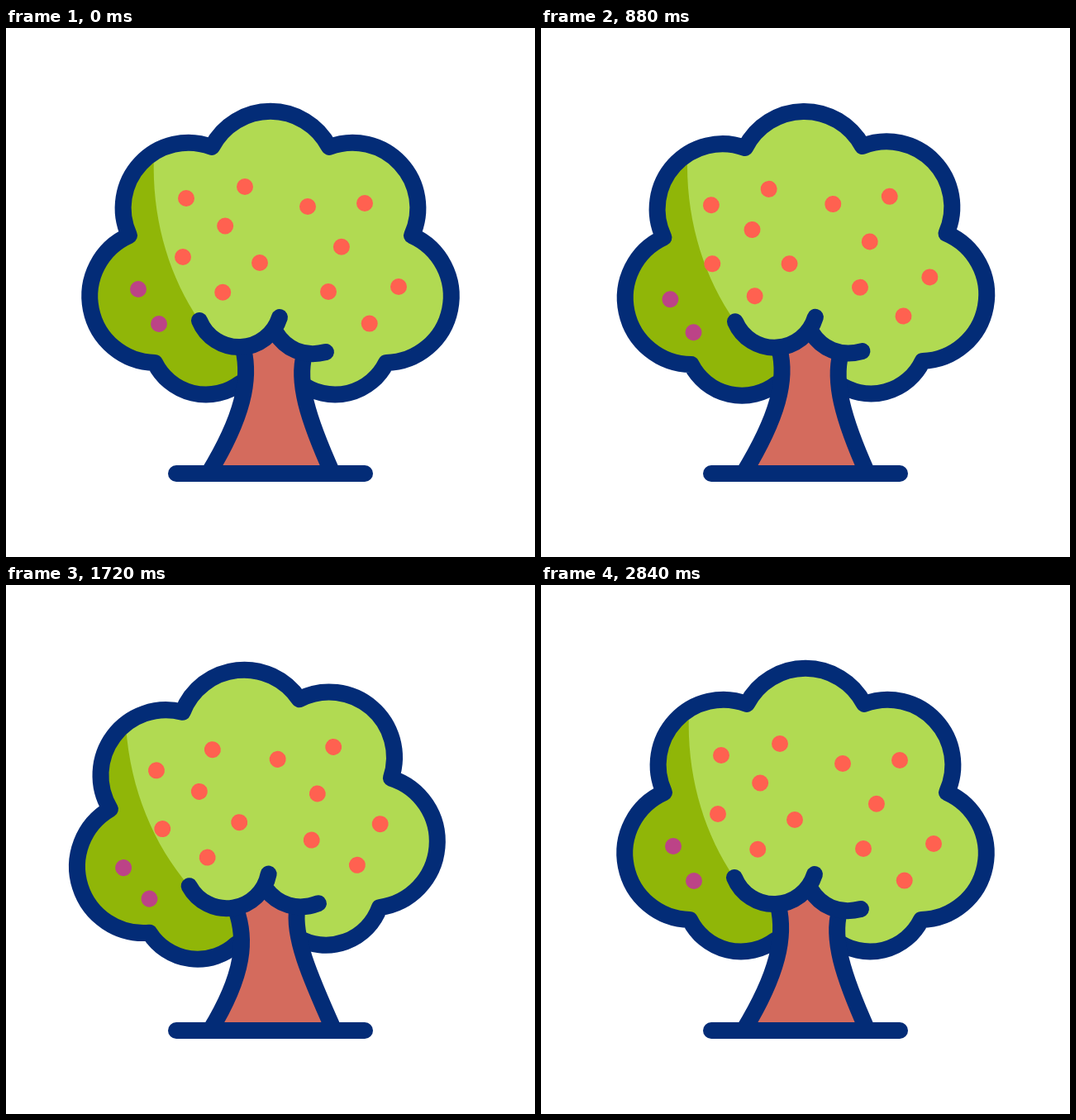
These frames come from a looping animation (640 px wide and 640 px high, 3 s). An HTML page with a canvas:

```html
<!DOCTYPE html>
<html lang="en">
<head>
<meta charset="utf-8">
<title>Tree in the wind</title>
<style>
html, body { margin: 0; width: 100%; height: 100%; overflow: hidden; background: #fff; }
canvas { display: block; width: 640px; height: 640px; }
</style>
</head>
<body>
<canvas id="stage" width="640" height="640"></canvas>
<script>
const ctx = document.getElementById('stage').getContext('2d');
const LOOP = 3000, STEP = 40, START = 120, HALF_SWING = 520;
const NAVY = '#032c77', LIGHT = '#b1da52', DARK = '#90b608', BARK = '#d46b5d',
      RED = '#ff6150', PURPLE = '#bc4387', TEAL = '#67cbd2';
const CENTER = { x: 320, y: 325 };
const SWAY = [0, -0.91, 1, -0.56, 1, 0];

const ease = p => (1 - Math.cos(Math.PI * Math.min(1, Math.max(0, p)))) / 2;

// Every part sways by the same rule, with its own size and delay.
function sway(t, size, delay) {
  const swings = Math.max(0, (t - START - delay) / HALF_SWING);
  const i = Math.min(Math.floor(swings), SWAY.length - 2);
  return size * (SWAY[i] + (SWAY[i + 1] - SWAY[i]) * ease(swings - i));
}

function makePose(degrees, shift, lift) {
  const angle = degrees * Math.PI / 180;
  return { angle, shift, x: CENTER.x + shift, y: CENTER.y + lift * (1 - Math.cos(angle)) };
}

function place(pose, x, y) {
  const dx = x - CENTER.x, dy = y - CENTER.y;
  const c = Math.cos(pose.angle), s = Math.sin(pose.angle);
  return [pose.x + dx * c - dy * s, pose.y + dx * s + dy * c];
}

function withPose(pose, draw) {
  ctx.save();
  ctx.translate(pose.x, pose.y);
  ctx.rotate(pose.angle);
  ctx.translate(-CENTER.x, -CENTER.y);
  draw();
  ctx.restore();
}

// The crown is symmetric: lobes run from notch to notch up the left side and down the right.
function crownPath() {
  const left = [[283, 430], [180, 405], [149, 251], [249, 144]];
  const radii = [69, 80.5, 79, 80];
  const notches = [...left, ...left.map(([x, y]) => [640 - x, y]).reverse()];
  const arcs = notches.slice(1).map(([x, y], i) => {
    const r = radii[Math.min(i, 6 - i)];
    return `A${r} ${r} 0 0 1 ${x} ${y}`;
  });
  return new Path2D(`M${left[0]}${arcs.join('')}`);
}

const crown = crownPath();
const lightSide = new Path2D(
  'M179 60V155C176 230 197 300 234 354Q252 386 285 386L320 440V480H600V60Z');
const curls = new Path2D(
  'M234 354A51.6 51.6 0 0 0 331 350M326 368C338 388 360 399 387 392');

function drawCrown() {
  ctx.fillStyle = DARK;
  ctx.fill(crown);
  ctx.save();
  ctx.clip(crown);
  ctx.fillStyle = LIGHT;
  ctx.fill(lightSide);
  ctx.restore();
  ctx.stroke(crown);
}

function dot(x, y, color) {
  ctx.beginPath();
  ctx.arc(x, y, 10, 0, 2 * Math.PI);
  ctx.fillStyle = color;
  ctx.fill();
}

// Three fruits: two given ones and a third hanging below the line between them.
function drawCluster(x0, y0, x1, y1, drop) {
  const dx = x1 - x0, dy = y1 - y0, length = Math.hypot(dx, dy);
  dot(x0, y0, RED);
  dot(x1, y1, RED);
  dot(x0 + 0.55 * dx - drop * dy / length, y0 + 0.55 * dy + drop * dx / length, RED);
}

function drawFruits() {
  drawCluster(218, 206, 289, 192, 42);
  drawCluster(214, 277, 307, 284, 39);
  drawCluster(365, 216, 434, 212, 51);
  drawCluster(390, 319, 475, 313, 42);
  dot(160, 316, PURPLE);
  dot(185, 358, PURPLE);
}

// The top of the trunk follows the crown while its foot recoils slightly.
function drawTrunk(pose) {
  const recoil = -0.12 * pose.shift;
  const sides = () => {
    ctx.beginPath();
    ctx.moveTo(...place(pose, 287, 388));
    ctx.bezierCurveTo(...place(pose, 296, 425), 287 + recoil, 470, 245 + recoil, 539);
  };
  const rightSide = () => ctx.bezierCurveTo(
    364 + recoil, 470, ...place(pose, 352, 428), ...place(pose, 361, 395));

  sides();
  ctx.lineTo(395 + recoil, 539);
  rightSide();
  ctx.lineTo(...place(pose, 322, 371));
  ctx.fillStyle = BARK;
  ctx.fill();

  sides();
  ctx.moveTo(395 + recoil, 539);
  rightSide();
  ctx.stroke();
}

function drawLine(x0, x1, y, color) {
  ctx.beginPath();
  ctx.moveTo(x0, y);
  ctx.lineTo(x1, y);
  ctx.strokeStyle = color;
  ctx.stroke();
}

function drawGust(t) {
  if (t <= START || t >= 720) return;
  const head = 69 * ease((t - START) / 360), tail = 69 * ease((t - 320) / 360);
  drawLine(620 - tail, 619.99 - head, 28, TEAL);
  drawLine(581 - tail, 580.99 - head, 145, TEAL);
}

function draw(t) {
  ctx.fillStyle = '#fff';
  ctx.fillRect(0, 0, 640, 640);
  ctx.lineWidth = 20;
  ctx.lineCap = ctx.lineJoin = 'round';

  const crownPose = makePose(sway(t, 11.7, 0), sway(t, 31, -15), 155);
  const fruitPose = makePose(sway(t, 16.3, 35), sway(t, 34, 5), 50);

  drawGust(t);
  ctx.strokeStyle = NAVY;
  withPose(crownPose, drawCrown);
  withPose(fruitPose, drawFruits);
  drawTrunk(crownPose);
  withPose(crownPose, () => ctx.stroke(curls));
  drawLine(206, 434, 539, NAVY);
}

let start;
function tick(now) {
  start ??= now;
  draw(Math.floor((now - start) % LOOP / STEP) * STEP);
  requestAnimationFrame(tick);
}
draw(0);
requestAnimationFrame(tick);
</script>
</body>
</html>
```
